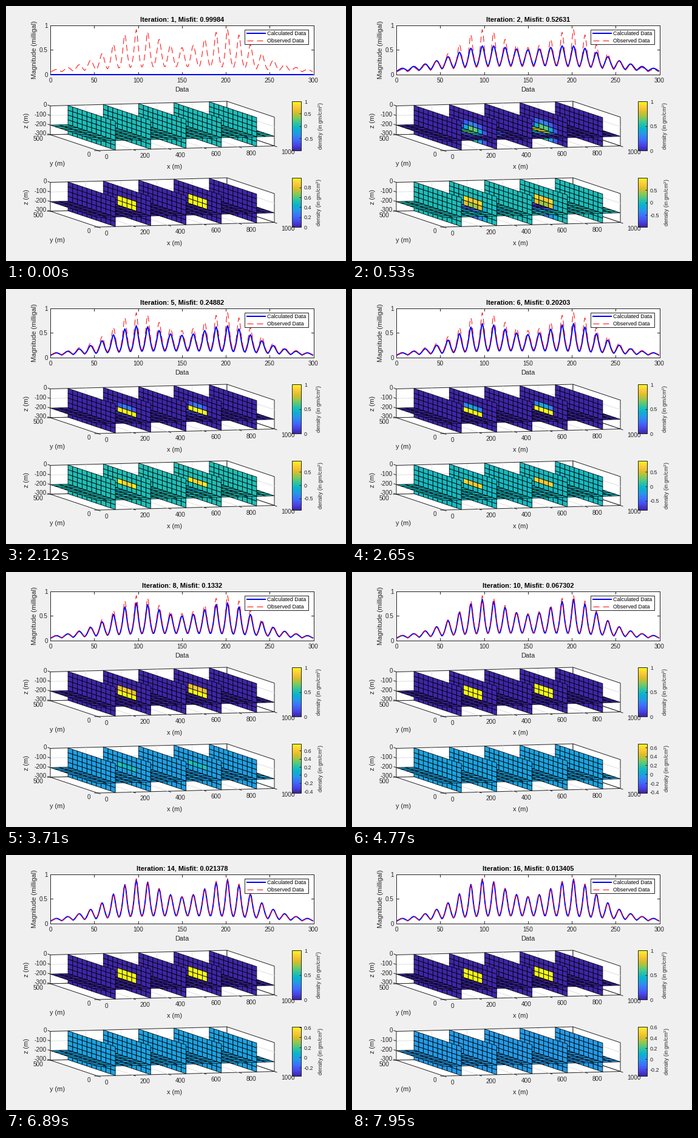
A matplotlib script that plays this animation: 560 by 420 pixels, repeating every 8 s.

```python
import numpy as np
import matplotlib.pyplot as plt
from matplotlib.animation import FuncAnimation
from matplotlib.collections import LineCollection, PolyCollection
from matplotlib.colors import LinearSegmentedColormap
from matplotlib.patches import Polygon, Rectangle

plt.rcParams.update({
    "font.family": "Liberation Sans",
    "mathtext.fontset": "custom",
    "mathtext.rm": "Liberation Sans",
})

W, H, DPI = 560, 420, 100
PX = 72 / DPI
LOOP, STEP, HOLD = 8000, 40, 530
INK = "#262626"

PARULA = LinearSegmentedColormap.from_list("parula", [
    (.2422, .1504, .6603), (.2803, .2782, .9221), (.2440, .4358, .9988),
    (.1540, .5902, .9218), (.0297, .7082, .8163), (.1938, .7758, .6251),
    (.5044, .7993, .3480), (.8634, .7406, .1596), (.9930, .8000, .2200),
    (.9769, .9839, .0805)])

MISFIT = {1: .99984, 3: .27705, 5: .24882, 8: .1332, 10: .067302,
          12: .034092, 16: .013405}


def misfit(it):
    return np.exp(np.interp(it, list(MISFIT), np.log(list(MISFIT.values()))))


def overshoot(it):
    """How far the early solutions reach too deep, 1 to 0."""
    return np.exp(-1.5 * max(it - 3, 0))


def fall(it, mid, width):
    return 1 / (1 + np.exp((it - mid) / width))


def response(amp=.85, width=170, depth=150):
    """Pull of two buried blocks on 23 rows of 13 stations."""
    n = np.arange(299)
    x = (n // 13) * 1000 / 22
    y = (n % 13) * 500 / 12 - 250
    return amp * sum((1 + ((x - c) / width) ** 2 + (y / depth) ** 2) ** -1.5
                     for c in (320, 680))


def calculated(it):
    err, deep = misfit(it), overshoot(it)
    amp = .85 * max(1 - 1.3 * err, 0) + .23 * deep * (it > 1)
    return response(amp, 170 + 80 * err + 25 * deep, 150 + 40 * err + 30 * deep)


def blocks(points, sag=0, bottom=200, soft=1):
    """Density of the two blocks with edges blurred over `soft` metres."""
    x, y, z = points.T
    dx = np.minimum(abs(x - 320), abs(x - 680))
    dy = abs(y - 250)
    top = 100 + sag * (1 + .3 * (dy / 100) ** 2)
    rho = 1
    for inside in (60 - dx, 100 - dy, z - top, bottom - z):
        rho = rho * np.clip(.5 + inside / soft, 0, 1)
    return rho


def solution(points, it):
    if it == 1:
        return np.zeros(len(points))
    return blocks(points, 45 * fall(it, 6.8, 1.2), 200 + 90 * overshoot(it),
                  30 + 250 * np.exp(-it / 2))


def error_range(it):
    hi = .6 + .4 * fall(it, 7.5, 1.8)
    lo = -.42 + .025 * max(it - 12, 0) - .55 * fall(it, 6.5, .5)
    return (0 if it == 1 else lo), hi


fig = plt.figure(figsize=(W / DPI, H / DPI), dpi=DPI, facecolor="#f0f0f0")
ax = fig.add_axes([0, 0, 1, 1])
ax.axis("off")


def text(x, y, s, size=10, ha="center", rot=0, **kw):
    """Text whose capitals are centred on the given point."""
    drop = .36 * size
    pos = (x + drop, y) if rot else (x, y + drop)
    return ax.text(*pos, s, size=size * PX, ha=ha, va="baseline", rotation=rot,
                   rotation_mode="anchor", **kw)


def line(xs, ys, color=INK, lw=1, z=2, **kw):
    return ax.plot(xs, ys, color=color, lw=lw * PX, zorder=z, **kw)[0]


def box(x0, y0, x1, y1, face, z):
    ax.add_patch(Rectangle((x0, y0), x1 - x0, y1 - y0, fc=face, ec=INK,
                           lw=PX, zorder=z))


class Chart:
    X0, X1, Y0, Y1 = 73, 506.5, 112.5, 32

    def __init__(self):
        x0, x1, y0, y1 = self.X0, self.X1, self.Y0, self.Y1
        box(x0, y1, x1, y0, "white", .5)
        for v in range(0, 301, 50):
            x = x0 + (x1 - x0) * v / 300
            line([x, x], [y0, y0 - 4])
            line([x, x], [y1, y1 + 4])
            text(x, 122, str(v), color=INK)
        for v in (0, .5, 1):
            y = self.to_y(v)
            line([x0, x0 + 4], [y, y])
            line([x1 - 4, x1], [y, y])
            text(69, y + .5, f"{v:g}", ha="right", color=INK)
        text(290, 137, "Data", 11, color=INK)
        text(46, 72, "Magnitude (milligal)", 11, rot=90, color=INK)
        self.title = text(290, 22, "", 11, weight="bold")

        xs = x0 + (x1 - x0) * np.arange(1, 300) / 300
        dash = dict(color="red", linestyle=(0, (10, 6)), dash_capstyle="butt")
        self.calc = line(xs, xs, "blue", 2, 2.5)
        line(xs, self.to_y(response()), z=2.6, **dash)

        box(393, 38.5, 498, 62.5, "white", 4)
        line([397, 427], [45, 45], "blue", 2, 5)
        line([397, 427], [57, 57], z=5, **dash)
        text(430, 45, "Calculated Data", 9, "left", zorder=6)
        text(430, 56.5, "Observed Data", 9, "left", zorder=6)

    def to_y(self, v):
        return self.Y0 + (self.Y1 - self.Y0) * v

    def show(self, it):
        self.title.set_text(f"Iteration: {it}, Misfit: {misfit(it):.5g}")
        self.calc.set_ydata(self.to_y(calculated(it)))


class Panel:
    BAR = 471, 486

    def __init__(self, top, step=None):
        self.top, self.step = top, step
        self.draw_frame()
        self.draw_cells()
        self.draw_bar()

    def p(self, x, y, z):
        """Orthographic projection of metres to pixels."""
        back = 1 - y / 500
        return (73 + 291 * x / 1000 + 78 * back,
                self.top + 7.5 * (1 - x / 1000) + 26 * back - 47.5 * z / 300)

    def grid_line(self, a, b):
        line(*zip(self.p(*a), self.p(*b)), "#dfdfdf", z=.6)

    def draw_frame(self):
        walls = [
            [(0, 500, 0), (1000, 500, 0), (1000, 500, -300), (0, 500, -300)],
            [(1000, 500, 0), (1000, 0, 0), (1000, 0, -300), (1000, 500, -300)],
            [(0, 500, -300), (1000, 500, -300), (1000, 0, -300), (0, 0, -300)],
        ]
        for wall in walls:
            ax.add_patch(Polygon([self.p(*q) for q in wall], fc="white",
                                 ec=INK, lw=PX, zorder=.5))
        for x in range(200, 1000, 200):
            self.grid_line((x, 500, 0), (x, 500, -300))
            self.grid_line((x, 500, -300), (x, 0, -300))
        for z in (-100, -200):
            self.grid_line((0, 500, z), (1000, 500, z))
            self.grid_line((1000, 500, z), (1000, 0, z))

        for v in range(0, 1001, 200):
            x, y = self.p(v, 0, -300)
            line([x, x + 4], [y, y + 1.4])
            text(x + 11.5, y + 10, str(v), ha="left", color=INK)
        for v in (500, 0):
            x, y = self.p(0, v, -300)
            line([x - 5, x], [y + .1, y])
            text(x - 11.5, y + 6.5, str(v), ha="right", color=INK)
        for v in range(0, -301, -100):
            x, y = self.p(0, 500, v)
            line([x - 4, x], [y - 1.4, y])
            text(67, y - 2.2, str(v), ha="right", color=INK)
        text(278, self.top + 107, "x (m)", 11, color=INK)
        text(85, self.top + 102, "y (m)", 11, color=INK)
        text(33, self.top + 31, "z (m)", 11, rot=90, color=INK)

    def draw_cells(self):
        """Quads from far to near; strips of the level slice go in between."""
        quads, points = [], []

        def add(point, *corners):
            points.append(point)
            quads.append([self.p(*c) for c in corners])

        for x in range(950, -1, -50):
            for y in range(500, 0, -50):
                add((x + 25, y - 25, 225), (x, y, -200), (x + 50, y, -200),
                    (x + 50, y - 50, -200), (x, y - 50, -200))
            if x % 200 != 100:
                continue
            for y in range(500, 0, -50):
                for z in range(0, -300, -50):
                    add((x, y - 25, 25 - z), (x, y, z), (x, y - 50, z),
                        (x, y - 50, z - 50), (x, y, z - 50))
        self.points = np.array(points)
        self.cells = PolyCollection(quads, edgecolors="black",
                                    linewidths=.8 * PX, zorder=1)
        ax.add_collection(self.cells)

    def draw_bar(self):
        x0, x1 = self.BAR
        top, bottom = self.top, self.top + 81
        ax.imshow(np.linspace(1, 0, 256)[:, None], cmap=PARULA, aspect="auto",
                  extent=(x0, x1, bottom, top), zorder=.5)
        box(x0, top, x1, bottom, "none", 2)
        self.marks = LineCollection([], colors=INK, linewidths=PX, zorder=3)
        ax.add_collection(self.marks)
        self.labels = [text(491, 0, "", 9, "left", color=INK)
                       for _ in range(8)]
        self.name = text(516, top + 40.5, "density (in gm/cm$^{3}$)", 9,
                         rot=90, color=INK)

    def show(self, rho, lo, hi):
        self.cells.set_facecolor(PARULA(np.clip((rho - lo) / (hi - lo), 0, 1)))

        step = self.step or (.2 if hi - lo < 1.4 else .5)
        first, last = np.ceil(lo / step), np.floor(hi / step)
        x1 = self.BAR[1]
        marks = []
        for label in self.labels:
            label.set_text("")
        for v, label in zip(np.arange(first, last + 1) * step, self.labels):
            y = self.top + 81 * (hi - v) / (hi - lo)
            marks.append([(x1 - 3, y), (x1, y)])
            label.set_text(f"{round(v, 1) + 0.0:g}")
            label.set_y(y + .5 + .36 * 9)
        self.marks.set_segments(marks)
        self.name.set_x((519 if lo < 0 else 516) + .36 * 9)


chart = Chart()
result = Panel(157, .5)
error = Panel(283)
ax.set_xlim(0, W)
ax.set_ylim(H, 0)
shown = None


def update(i):
    global shown
    it = (i * STEP + STEP - 1) // HOLD + 1
    if it != shown:
        shown = it
        rho = solution(result.points, it)
        chart.show(it)
        result.show(rho, -.99 if it == 1 else 0, 1)
        error.show(blocks(error.points) - rho, *error_range(it))
    return []


anim = FuncAnimation(fig, update, frames=LOOP // STEP, interval=STEP,
                     init_func=lambda: update(0), repeat=True, repeat_delay=0)
plt.show()
```
